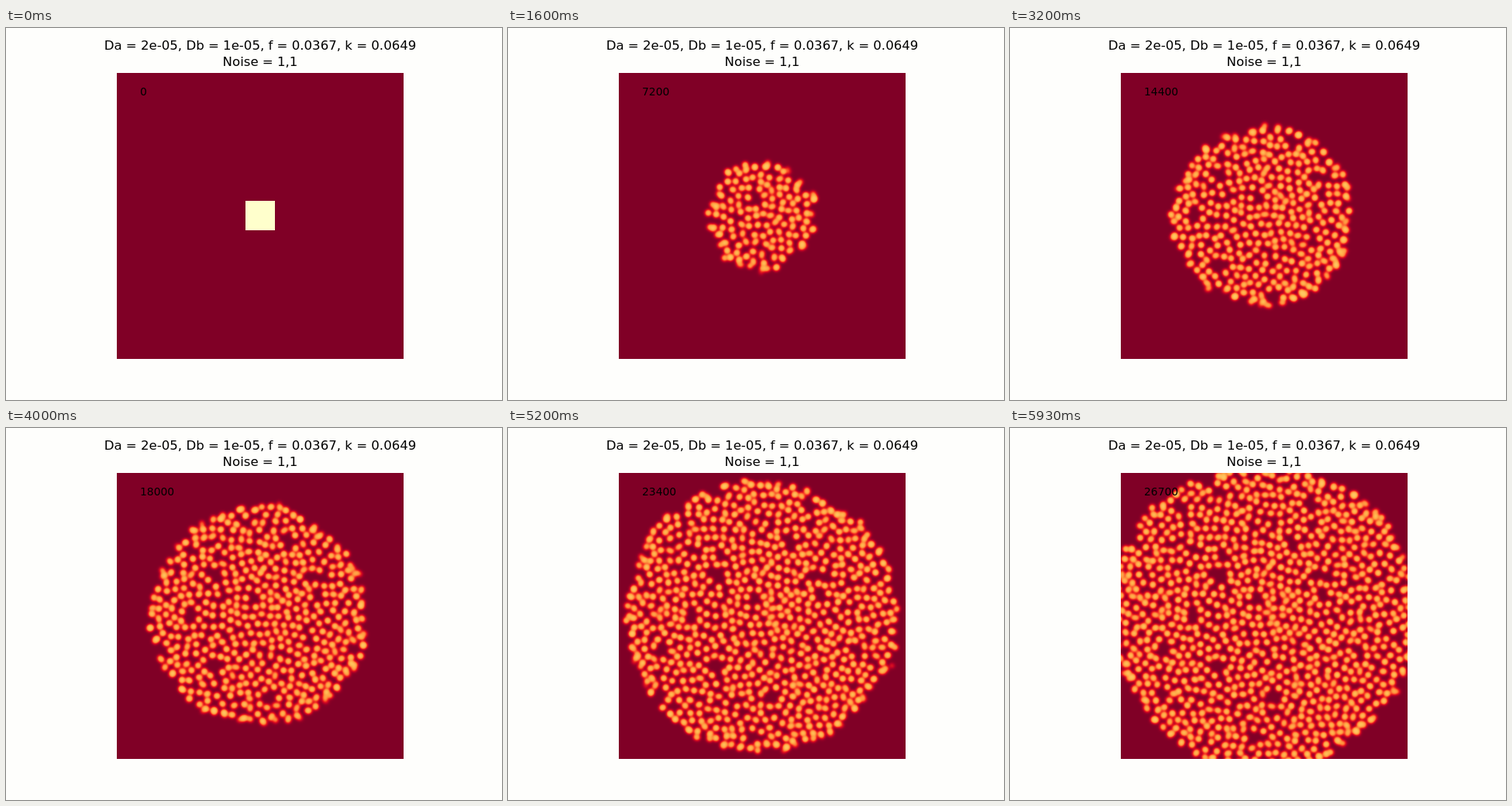
Write an HTML page with a canvas that moves like this. It is 640 px wide and 480 px high and loops after 6000 ms.

```html
<!DOCTYPE html>
<html lang="en">
<head>
<meta charset="utf-8">
<title>Reaction-diffusion spots</title>
<style>
  html, body { margin: 0; width: 100%; height: 100%; overflow: hidden; background: #fefefc; }
  canvas { position: absolute; left: 143px; top: 58px; }
  svg { position: absolute; left: 0; top: 0; }
  text { font-family: "DejaVu Sans", sans-serif; font-size: 16.58px; fill: #000; }
  #count { font-size: 13.89px; }
</style>
</head>
<body>
<canvas id="plot" width="370" height="369"></canvas>
<svg width="640" height="480" viewBox="0 0 640 480">
  <text x="328" y="28" text-anchor="middle">Da = 2e-05, Db = 1e-05, f = 0.0367, k = 0.0649</text>
  <text x="328" y="49" text-anchor="middle">Noise = 1,1</text>
  <text id="count" x="173" y="87">0</text>
</svg>
<script>
const W = 370, H = 369, CX = 185, CY = 184;
const FRAMES = 90, LOOP = 6000, STEPS = 300;
const SPEED = 0.0291, START_R = 29, SPLIT = 420;
const SIGMA = 2.6, REACH = 8, GAP = 9.2, SPACING = 11.6;

const ctx = document.getElementById('plot').getContext('2d');
const count = document.getElementById('count');
const image = ctx.createImageData(W, H);
const pixels = new Uint32Array(image.data.buffer);
const field = new Float32Array(W * H);

function randomizer(seed) {
  return () => {
    seed = (seed + 0x6D2B79F5) | 0;
    let z = Math.imul(seed ^ (seed >>> 15), 1 | seed);
    z = (z + Math.imul(z ^ (z >>> 7), 61 | z)) ^ z;
    return ((z ^ (z >>> 14)) >>> 0) / 4294967296;
  };
}
const rand = randomizer(41);
const clamp = v => Math.max(0, Math.min(1, v));
const smooth = v => { v = clamp(v); return v * v * (3 - 2 * v); };

// YlOrRd, dark to light
const ramp = [0x800026, 0xbd0026, 0xe31a1c, 0xfc4e2a, 0xfd8d3c, 0xfeb24c, 0xfed976, 0xffeda0, 0xffffcc];
const palette = Uint32Array.from({ length: 256 }, (_, i) => {
  const v = i / 255 * 8, s = Math.min(7, Math.floor(v));
  const mix = shift => {
    const a = (ramp[s] >> shift) & 255, b = (ramp[s + 1] >> shift) & 255;
    return Math.round(a + (b - a) * (v - s));
  };
  return ((255 << 24) | (mix(0) << 16) | (mix(8) << 8) | mix(16)) >>> 0;
});

function scatter() {
  const pts = [];
  for (let i = 0; i < 40000; i++) {
    const x = (rand() * 2 - 1) * 191, y = (rand() * 2 - 1) * 191;
    if (Math.hypot(x, y) > 212) continue;
    if (pts.some(p => (p.x - x) ** 2 + (p.y - y) ** 2 < GAP * GAP)) continue;
    pts.push({ x, y });
  }
  return pts;
}

// Push close neighbours apart for an even spacing
function relax(pts) {
  for (let i = 0; i < pts.length; i++) {
    for (let j = 0; j < i; j++) {
      const a = pts[i], b = pts[j];
      const dx = a.x - b.x, dy = a.y - b.y, d = Math.hypot(dx, dy);
      if (d >= SPACING) continue;
      const k = 0.2 * (SPACING - d) / d;
      a.x += dx * k; a.y += dy * k;
      b.x -= dx * k; b.y -= dy * k;
    }
  }
}

// Each spot splits off an older neighbour as the front reaches it
function makeSpots() {
  let spots = scatter();
  for (let i = 0; i < 6; i++) relax(spots);
  spots = spots.filter(() => rand() > 0.03);
  for (const s of spots) {
    const r = Math.hypot(s.x + 2, s.y), a = Math.atan2(s.y, s.x);
    const lobe = 4 * (1 + Math.sin(5 * a + r / 25) * Math.cos(2 * a - r / 40));
    const rough = (lobe + 5 * rand()) * Math.min(1, r / 60);
    const arrival = (r + rough - START_R) / SPEED - 300;
    s.birth = r < 12 ? 100 + 250 * rand() : Math.max(arrival, -200 + 150 * rand());
    s.angle = rand() * Math.PI;
    s.phase = rand() * 2 * Math.PI;
    s.stretch = 0.5 + 1.6 * rand();
    s.level = 0.92 + 0.16 * rand();
  }
  spots.sort((a, b) => a.birth - b.birth);
  spots.forEach((s, i) => {
    s.parent = s;
    let best = 400;
    for (let j = 0; j < i; j++) {
      const p = spots[j], d = (p.x - s.x) ** 2 + (p.y - s.y) ** 2;
      if (p.birth < s.birth - 150 && d < best) { best = d; s.parent = p; }
    }
  });
  return spots;
}
const spots = makeSpots();

const gx = new Float32Array(2 * REACH + 1);
function splat(x, y, amp) {
  const px = Math.round(x), py = Math.round(y), k = 1 / (2 * SIGMA * SIGMA);
  for (let i = -REACH; i <= REACH; i++) gx[i + REACH] = amp * Math.exp(-k * (px + i - x) ** 2);
  const x0 = Math.max(0, px - REACH), x1 = Math.min(W - 1, px + REACH);
  const y0 = Math.max(0, py - REACH), y1 = Math.min(H - 1, py + REACH);
  for (let j = y0; j <= y1; j++) {
    const gy = Math.exp(-k * (j - y) ** 2);
    for (let i = x0; i <= x1; i++) field[j * W + i] += gy * gx[i - px + REACH];
  }
}

function drawSpot(s, t) {
  if (t <= s.birth) return;
  const grow = smooth((t - s.birth) / SPLIT);
  const p = s.parent;
  const x = CX + p.x + (s.x - p.x) * grow + 1.3 * Math.sin(t / 900 + s.phase);
  const y = CY + p.y + (s.y - p.y) * grow + 1.3 * Math.cos(t / 1100 + 2 * s.phase);
  const fresh = 1 - clamp((t - s.birth - SPLIT) / 700);
  const pulse = 0.06 * Math.sin(t / 350 + 3 * s.phase);
  const amp = (0.15 + 0.85 * grow) * (s.level + pulse + 0.1 * fresh);
  const d = s.stretch * (0.75 + 0.25 * Math.sin(t / 500 + s.phase));
  const dx = d * Math.cos(s.angle), dy = d * Math.sin(s.angle);
  splat(x - dx, y - dy, amp * 0.56);
  splat(x + dx, y + dy, amp * 0.56);
}

// The square collapses to its rim, which then breaks into spots
function drawRim(n) {
  const fade = 0.8 * (1 - n / 5), edge = 18 + n;
  for (let j = -34; j <= 34; j++) {
    for (let i = -34; i <= 34; i++) {
      const q = (i ** 4 + j ** 4) ** 0.25;
      field[(CY + j) * W + CX + i] += fade * Math.exp(-(((q - edge) / 4) ** 2));
    }
  }
}

function paint(n) {
  field.fill(0);
  if (n > 0 && n < 5) drawRim(n);
  if (n > 0) for (const s of spots) drawSpot(s, n * LOOP / FRAMES);
  for (let i = 0; i < field.length; i++) {
    pixels[i] = palette[Math.round(255 * 0.7 * Math.tanh(1.5 * field[i]))];
  }
  if (n === 0) {
    for (let j = -19; j < 19; j++) {
      const row = (CY + j) * W + CX;
      pixels.fill(palette[255], row - 19, row + 19);
    }
  }
  ctx.putImageData(image, 0, 0);
  count.textContent = n * STEPS;
}

const startOf = n => Math.round(n * 20 / 3) * 10;
let shown = -1;

function render(time) {
  const t = time % LOOP;
  let n = Math.min(FRAMES - 1, Math.ceil(t * FRAMES / LOOP));
  while (n > 0 && startOf(n) > t) n--;
  if (n === shown) return;
  shown = n;
  paint(n);
}

function tick(now) {
  render(Math.max(0, now));
  requestAnimationFrame(tick);
}
render(0);
requestAnimationFrame(tick);
</script>
</body>
</html>
```
